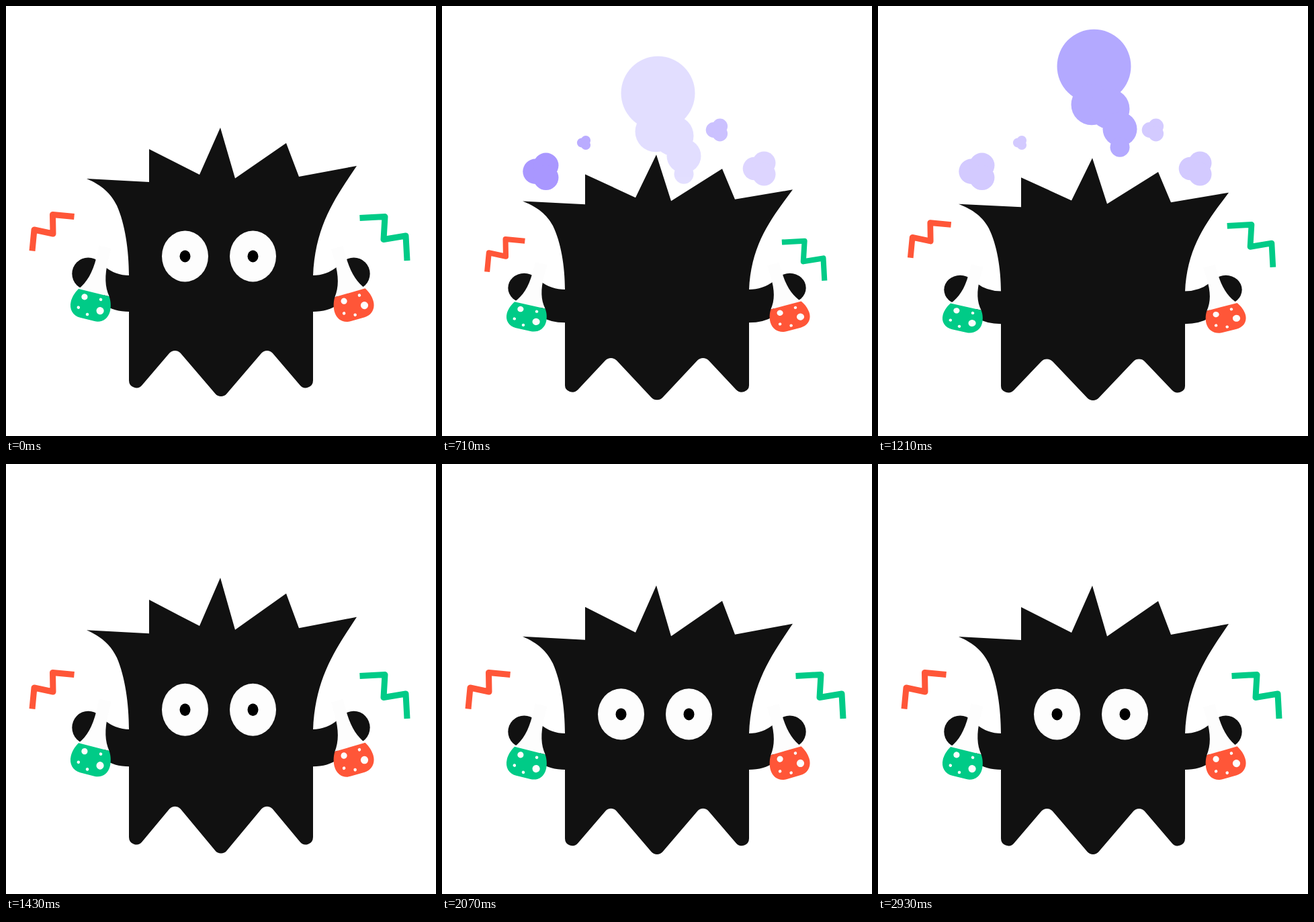
Recreate the animation shown at these times as an HTML page. Size 640 by 640 pixels, loop 3.87 s.

```html
<!DOCTYPE html>
<html lang="en">
<head>
<meta charset="utf-8">
<title>Little chemist</title>
<style>
  html, body { margin: 0; width: 100%; height: 100%; overflow: hidden; background: #fff; }
  svg { display: block; width: 100%; height: 100%; }
  #zigs { fill: none; stroke-width: 9; stroke-linejoin: round; }
</style>
</head>
<body>
<svg viewBox="0 0 640 640">
  <g id="smoke"></g>
  <g id="zigs">
    <path stroke="#ff5638" d="M101.5 313.5 69.5 310.5 70 339 42 333 39 364.5"/>
    <path stroke="#00cb87" d="M526.5 315.5 564 313.5 562 347.5 595 342 597 379"/>
  </g>
  <g id="monster"></g>
</svg>
<script>
const LOOP = 3870, FPS = 14;
const SQUASH = 265, RELEASE = 1270, SPRING = 1500;
const RED = '#ff5638', GREEN = '#00cb87', INK = '#111', WHITE = '#fdfdfd';
const $ = id => document.getElementById(id);

function add(parent, tag, attrs) {
  const el = document.createElementNS('http://www.w3.org/2000/svg', tag);
  for (const k in attrs) el.setAttribute(k, attrs[k]);
  return parent.appendChild(el);
}
const group = (parent, attrs) => add(parent, 'g', attrs);
const path = (parent, d, fill) => add(parent, 'path', { d, fill });
const oval = (parent, cx, cy, rx, ry = rx, fill) => add(parent, 'ellipse', { cx, cy, rx, ry, ...(fill && { fill }) });

// Polyline through the inner points with every corner rounded to radius r.
function rounded(points, r) {
  return points.slice(1, -1).map((b, i) => {
    const [u, v] = [points[i], points[i + 2]].map(p => {
      const dx = p[0] - b[0], dy = p[1] - b[1], len = Math.hypot(dx, dy);
      return [dx / len, dy / len];
    });
    const cos = u[0] * v[0] + u[1] * v[1];
    const d = r * Math.sqrt((1 + cos) / (1 - cos));
    const sweep = u[0] * v[1] < u[1] * v[0] ? 1 : 0;
    return `L${b[0] + u[0] * d} ${b[1] + u[1] * d}A${r} ${r} 0 0 ${sweep} ${b[0] + v[0] * d} ${b[1] + v[1] * d}`;
  }).join('');
}

function drawBody(parent) {
  const hem = Array.from({ length: 5 }, (_, i) => [183 + 68.5 * i, i % 2 ? 507 : 587]);
  path(parent, 'M120 257C143 267 156 279 165 297C177 324 183 363 183 402'
    + rounded([[183, 402], ...hem, [457, 402]], 11)
    + 'L457 402C460 325 492 283 522 238L436 254 417 204 341 256.5 319 181 288 251 213 213V262Z', INK);
}

function drawArm(parent, transform) {
  const arm = group(parent, { transform });
  path(arm, 'M184 401Q162 401 146 387V444Q160 455 184 455Z', INK);
  oval(arm, 122.3, 398.5, 24, 24, INK);
}

function drawFlask(parent, x, y, tilt, color) {
  const flask = group(parent, { transform: `translate(${x} ${y}) rotate(${tilt})` });
  path(flask, 'M-23.5 -20C-14 -32 -9 -48 -9 -72V-90H9V-72C9 -48 14 -32 23.5 -20Z', WHITE);
  path(flask, 'M-23.5 -20H23.5C28 -13 30 -5 30 1C30 13 22 21 11 21H-11C-22 21 -30 13 -30 1C-30 -5 -28 -13 -23.5 -20Z', color);
  const bubbles = group(flask, { fill: WHITE });
  oval(bubbles, -12, -10.5, 4.6);
  oval(bubbles, 12.4, -12.5, 2.3);
  oval(bubbles, -17, 7, 2.3);
  oval(bubbles, 15.5, 4, 5.6);
  oval(bubbles, -1.7, 13.8, 2.3);
}

function puff(x, y, r) {
  const g = group($('smoke'), { fill: '#a896ff' });
  for (let k = 0; k < 3; k++) {
    const a = Math.PI * (1 + k * 2 / 3);
    oval(g, x + 0.56 * r * Math.cos(a), y + 0.56 * r * Math.sin(a), r);
  }
  return g;
}

const monster = $('monster');
drawBody(monster);
drawArm(monster, '');
drawArm(monster, 'translate(640 0) scale(-1 1)');
drawFlask(monster, 126, 446, 14, GREEN);
drawFlask(monster, 517.5, 446, -16, RED);
const eyes = group(monster);
for (const x of [266.5, 367.5]) {
  oval(eyes, x, 372.5, 34.5, 38, WHITE);
  oval(eyes, x, 372.5, 8, 9);
}

const puffs = [puff(149.5, 246.3, 18.7), puff(212, 203.5, 7.1), puff(410.5, 184.5, 11.4), puff(474.5, 242, 17.2)];
const plume = group($('smoke'), { fill: '#6a55ff' });
oval(plume, 321.5, 122.5, 55);
oval(plume, 318, 179.5, 30.5);
oval(plume, 344.5, 186, 30);
oval(plume, 360, 216, 25.5);
oval(plume, 360, 243, 14.5);
puffs.push(plume);

const ramp = (t, start, length) => Math.min(1, Math.max(0, (t - start) / length));
const easeOut = p => p * (2 - p);
const elastic = p => p <= 0 ? 0 : 1 - 2 ** (-10 * p) * Math.cos(p * 2 * Math.PI / 0.31);

function scaleAt(el, x, y, sx, sy) {
  el.setAttribute('transform', `translate(${x} ${y}) scale(${sx} ${sy}) translate(${-x} ${-y})`);
}

function draw(t) {
  const spring = elastic((t - SQUASH) / SPRING) - elastic((t - RELEASE) / SPRING);
  scaleAt(monster, 320, 640, 1, 1 - 0.1 * spring);

  const shut = ramp(t, SQUASH, 120) - ramp(t, RELEASE, 120);
  scaleAt(eyes, 320, 372.5, 1, 1 - shut);

  const pull = easeOut(ramp(t, SQUASH, 265)) - easeOut(ramp(t, 1110, 245));
  const zig = 1 - 0.1 * pull;
  scaleAt($('zigs'), 320, 676, zig, zig);

  const leave = ramp(t, 1100, 230);
  puffs.forEach((p, i) => p.setAttribute('opacity', ramp(t, 517 + 40 * i, 200) * (1 - leave)));
  const rise = 9 * (1 - ramp(t, 677, 200)) - 66 * leave;
  plume.setAttribute('transform', `translate(0 ${rise})`);
}

const began = performance.now();
function tick() {
  const t = (performance.now() - began) % LOOP;
  // Motion is held on steps of 14 per second.
  draw(Math.floor((t + 5) * FPS / 1000) * 1000 / FPS);
  requestAnimationFrame(tick);
}
tick();
</script>
</body>
</html>
```
